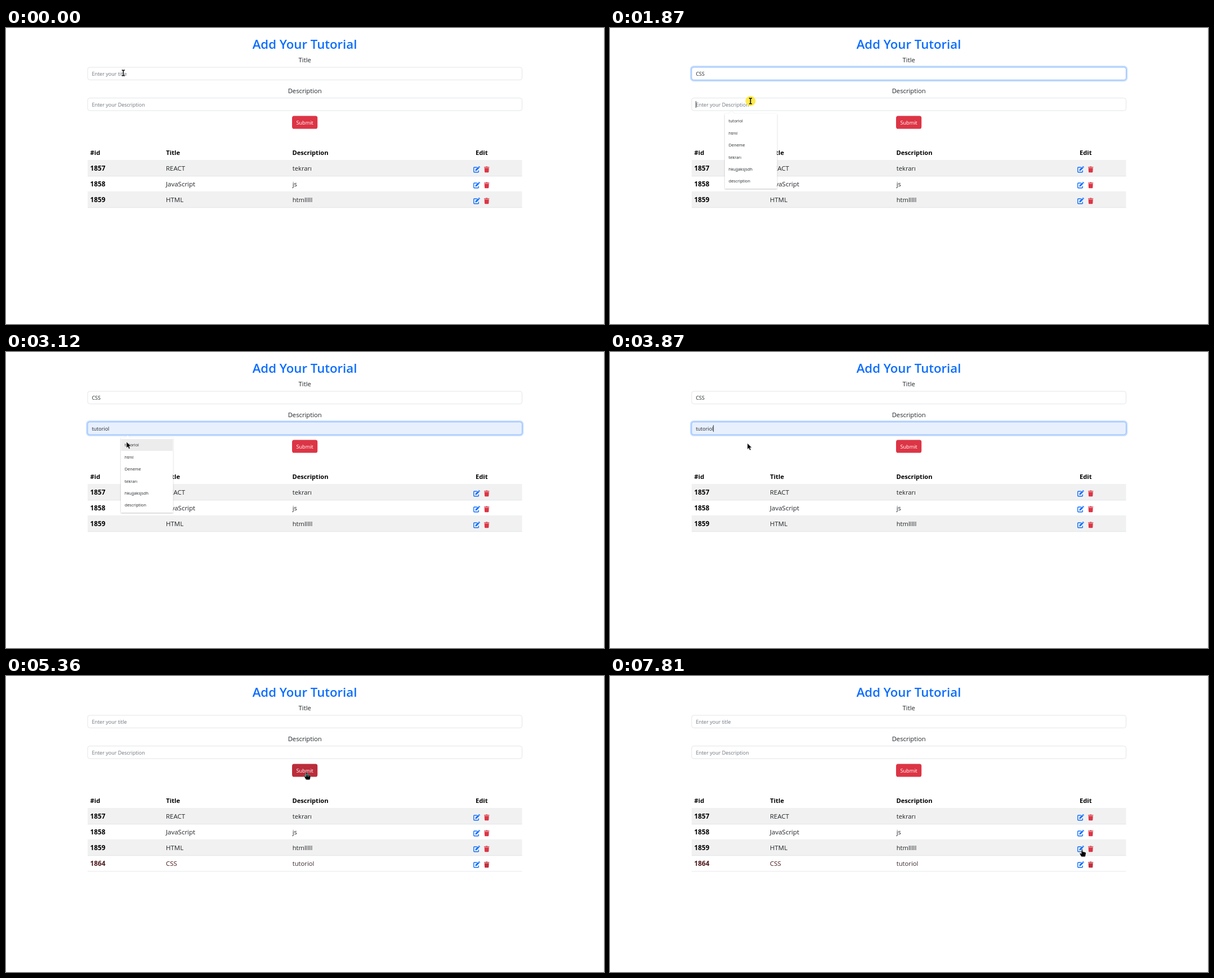
Recreate the animation shown at these times as an HTML page. Size 1062 by 527 pixels, loop 8000 ms.

```html
<!DOCTYPE html>
<html lang="en">
<head>
<meta charset="utf-8">
<title>Add Your Tutorial</title>
<style>
  html, body { margin: 0; width: 100%; height: 100%; overflow: hidden; background: #fff; }
  svg { display: block; width: 100%; height: 100%; }
  text { font: 11.25px "Open Sans", "Noto Sans", sans-serif; fill: #212529; white-space: pre; }
  .mid { text-anchor: middle; }
  .heading { font-size: 22.2px; font-weight: 600; fill: #0d6efd; }
  .value { font-size: 9px; }
  .empty { fill: #6c757d; }
  .button { font-size: 9.2px; fill: #fff; }
  .option { font-size: 7.3px; }
  .th { font-size: 11.15px; font-weight: 700; fill: #000; }
  .id { font-size: 11.8px; font-weight: 700; fill: #000; }
  .name { font-size: 11.5px; }
  .box { fill: #fff; stroke: #dee2e6; stroke-width: .9; }
  .ring { fill: none; stroke: #c2dbfe; stroke-width: 2.7; visibility: hidden; }
  .focus .ring { visibility: visible; }
  .focus .box { stroke: #86b7fe; }
  .filled .box { fill: #e8f0fe; }
  .caret { stroke: #000; stroke-width: .8; }
  .fresh .id { fill: #4a1418; }
  .fresh .name { fill: #4a1a1e; }
  .fresh .note { fill: #3a2628; }
  .fresh .trash { fill: #c22f3d; }
</style>
</head>
<body>
<svg viewBox="0 0 1062 527" preserveAspectRatio="none">
  <defs>
    <g id="edit" fill="none" stroke="#0d6efd">
      <path d="M6.6 2H1.6Q.7 2 .7 2.9V9.8Q.7 10.7 1.6 10.7H8.4Q9.3 10.7 9.3 9.8V7.4" stroke-width="1.4"/>
      <path d="M3.4 8.4 3.7 6 8.5 1.2 10.6 3.3 5.8 8.1ZM9 .7 9.7 .1Q10.2-.3 10.7 .2L11.7 1.2Q12.1 1.7 11.7 2.2L11.1 2.8Z" fill="#0d6efd" stroke="none"/>
    </g>
    <path id="trash" d="M0 .8H2.8L3.3 0H6L6.5 .8H9.3V2.1H0ZM.6 2.8H8.7L8.3 9.8Q8.2 10.8 7.2 10.8H2.1Q1.1 10.8 1 9.8Z"/>
    <filter id="shadow" x="-10%" y="-10%" width="120%" height="120%">
      <feDropShadow dx="0" dy=".8" stdDeviation="1.3" flood-opacity=".28"/>
    </filter>
  </defs>

  <rect x="1060" width="2" height="527" fill="#f8f8f8"/>
  <text class="heading mid" x="530.5" y="37.3">Add Your Tutorial</text>
  <text class="mid" x="530.7" y="60.8">Title</text>
  <text class="mid" x="530.7" y="115.6">Description</text>
  <g id="fields"></g>
  <path id="squiggle" fill="none" stroke="#e02020" stroke-width=".8"/>
  <rect id="submit" x="508" y="156.5" width="45.2" height="23" rx="3.6"/>
  <text class="button mid" x="530.6" y="171.5">Submit</text>
  <g id="table"></g>

  <g id="menu">
    <path d="M204 152.5H211.5L216 148.5 220.5 152.5H296.5V286H204Z" fill="#fff" filter="url(#shadow)"/>
    <rect id="hover" x="204.5" y="155" width="91.5" height="21" fill="#ececec"/>
  </g>

  <g id="pointer">
    <circle id="halo" r="9" fill="#ffe836" opacity=".9"/>
    <path id="beam" d="M-2.6-5Q-.6-5 0-4.2 .6-5 2.6-5M0-4.4V4.4M-2.6 5Q-.6 5 0 4.2 .6 5 2.6 5" fill="none" stroke="#000" stroke-width="1.5"/>
    <path id="arrow" d="M0 0V10.8L2.5 8.6 4.3 12.5 6.3 11.6 4.5 7.8H7.8Z" stroke="#fff" stroke-width=".5"/>
    <g id="hand">
      <path d="M-1.2 1Q0-.6 1.2 1V4.8L5.6 5.8Q7.1 6.2 6.9 7.8L6.1 11.9Q5.8 13.8 4.4 13.8H0Q-1.1 13.8-1.8 12.7L-4.1 8.5Q-4 6.9-2.6 7.4L-1.2 8.6Z" stroke="#fff" stroke-width=".4"/>
      <path id="glint" fill="none" stroke-width="1.1"/>
    </g>
  </g>
</svg>

<script>
const $ = id => document.getElementById(id);
const LOOP = 8000;
const LEFT = 152.4;

function add(parent, tag, attrs = {}, label = '') {
  const node = document.createElementNS('http://www.w3.org/2000/svg', tag);
  for (const key in attrs) node.setAttribute(key, attrs[key]);
  node.textContent = label;
  return parent.appendChild(node);
}
const show = (node, on) => { node.style.display = on ? '' : 'none'; };

function makeField(top, hint) {
  const group = add($('fields'), 'g');
  add(group, 'rect', { class: 'ring', x: 143.6, y: top - 1.4, width: 774.2, height: 25.2, rx: 5 });
  add(group, 'rect', { class: 'box', x: 145, y: top, width: 771.5, height: 22.4, rx: 3.8 });
  const text = add(group, 'text', { x: LEFT, y: top + 14.8 });
  const caret = add(group, 'path', { class: 'caret' });
  return (value, focus, blink, filled) => {
    group.setAttribute('class', (focus ? 'focus ' : '') + (filled ? 'filled' : ''));
    text.setAttribute('class', value ? 'value' : 'value empty');
    text.textContent = value || hint;
    const x = LEFT + .3 + (value ? text.getComputedTextLength() : 0);
    caret.setAttribute('d', `M${x} ${top + 5.5}v12`);
    show(caret, blink);
  };
}

function makeRow(index, id, name, note) {
  const top = 236 + index * 28;
  const row = add($('table'), 'g');
  if (index % 2 === 0) add(row, 'rect', { x: 145, y: top, width: 771.5, height: 28, fill: '#f1f1f1' });
  add(row, 'path', { d: `M145 ${top + 27.8}H916.5`, stroke: '#dee2e6', 'stroke-width': .8 });
  add(row, 'text', { class: 'id', x: 149.6, y: top + 18.4 }, id);
  add(row, 'text', { class: 'name', x: 284, y: top + 18.4 }, name);
  add(row, 'text', { class: 'note', x: 508.7, y: top + 18.4 }, note);
  add(row, 'use', { href: '#edit', x: 830, y: top + 10 });
  add(row, 'use', { class: 'trash', href: '#trash', x: 849, y: top + 10.4, fill: '#dc3545' });
  return row;
}

const setTitle = makeField(70, 'Enter your title');
const setDescription = makeField(124.7, 'Enter your Description');
[['#id', 149.6], ['Title', 284.3], ['Description', 508.5], ['Edit', 834]]
  .forEach(([label, x]) => add($('table'), 'text', { class: 'th', x, y: 226.4 }, label));
add($('table'), 'path', { d: 'M145 235.8H916.5', stroke: '#dee2e6', 'stroke-width': .8 });
makeRow(0, '1857', 'REACT', 'tekrarı');
makeRow(1, '1858', 'JavaScript', 'js');
makeRow(2, '1859', 'HTML', 'htmlllll');
const newRow = makeRow(3, '1864', 'CSS', 'tutoriol');
newRow.setAttribute('class', 'fresh');
['tutoriol', 'html', 'Deneme', 'tekrarı', 'hkujjaksjsdh', 'description'].forEach((label, i) =>
  add($('menu'), 'text', { class: 'option', x: 210.8, y: 168.4 + i * 21.4 }, label));
$('squiggle').setAttribute('d', `M${LEFT} 142` + 'l1.2-1.8 1.2 1.8'.repeat(13));

const at = (shape, x, y, halo = false) => ({ shape, x, y, halo });

// Each step keeps everything the previous one set.
const steps = [
  [0, { title: '', description: '', focus: '', caret: '', pointer: at('beam', 208.3, 80) }],
  [60, { focus: 'title', caret: 'title', pointer: at('beam', 208.3, 80, true) }],
  [300, { pointer: null }],
  [500, { title: 'C' }],
  [690, { title: 'CS' }],
  [880, { title: 'CSS' }],
  [1130, { caret: '', pointer: at('beam', 215, 80) }],
  [1380, { caret: 'title', pointer: at('beam', 224, 96) }],
  [1630, { caret: '', pointer: at('beam', 249.5, 130) }],
  [1870, { caret: 'description', menu: true, pointer: at('beam', 249.5, 130, true) }],
  [2120, { focus: 'description', pointer: at('beam', 249.5, 130) }],
  [2370, { caret: '', pointer: at('beam', 236, 136) }],
  [2620, { pointer: at('arrow', 207, 148) }],
  [2870, { caret: 'description', pointer: at('arrow', 199.2, 148) }],
  [3120, { caret: '', description: 'tutoriol', filled: true, hover: true, pointer: at('arrow', 214, 160) }],
  [3370, { pointer: at('arrow', 226, 164) }],
  [3870, { caret: 'description', menu: false, hover: false, pointer: at('arrow', 244, 162.5) }],
  [4130, { caret: '', pointer: at('arrow', 300, 151) }],
  [4370, { pointer: at('beam', 404, 80) }],
  [4610, { caret: '', pointer: at('arrow', 496, 151) }],
  [4860, { caret: 'description', squiggle: true, pressed: true, pointer: at('hand', 534, 171) }],
  [5110, { title: '', description: '', filled: false, squiggle: false, focus: '', caret: '', pointer: at('hand', 534, 171, true) }],
  [5360, { row: true, pointer: at('hand', 534, 171) }],
  [5610, { pressed: false, pointer: at('arrow', 452, 245) }],
  [5860, { pointer: at('arrow', 330, 332) }],
  [6100, { pointer: at('arrow', 299, 352) }],
  [6350, { pointer: at('arrow', 340, 348) }],
  [6600, { pointer: at('arrow', 520, 346) }],
  [6850, { pointer: at('arrow', 700, 330) }],
  [7100, { pointer: at('arrow', 818, 304) }],
  [7330, { pointer: at('arrow', 852, 286) }],
  [7570, { pointer: at('hand', 854, 306) }],
  [7810, { pointer: at('hand', 838.3, 308) }]
];

function draw(state) {
  setTitle(state.title, state.focus === 'title', state.caret === 'title', false);
  setDescription(state.description, state.focus === 'description', state.caret === 'description', state.filled);
  $('submit').setAttribute('fill', state.pressed ? '#bb2d3b' : '#dc3545');
  show($('squiggle'), state.squiggle);
  show($('menu'), state.menu);
  show($('hover'), state.hover);
  show(newRow, state.row);

  const pointer = state.pointer;
  show($('pointer'), pointer);
  if (!pointer) return;
  $('pointer').setAttribute('transform', `translate(${pointer.x} ${pointer.y})`);
  for (const shape of ['beam', 'arrow', 'hand']) show($(shape), shape === pointer.shape);
  show($('halo'), pointer.halo);
  $('glint').setAttribute('stroke', state.pressed ? '#16b8a4' : '#d98a1a');
  $('glint').setAttribute('d', state.pressed ? 'M-2 3.2V8M0 3V6.5M1.8 5.6V8.2M3.8 6.2V8.4' : 'M0 1V4');
}

let current = -1;
function tick(now) {
  const time = now % LOOP;
  const index = steps.filter(([start]) => start <= time).length - 1;
  if (index !== current) {
    current = index;
    draw(Object.assign({}, ...steps.slice(0, index + 1).map(step => step[1])));
  }
  requestAnimationFrame(tick);
}
tick(performance.now());
</script>
</body>
</html>
```
